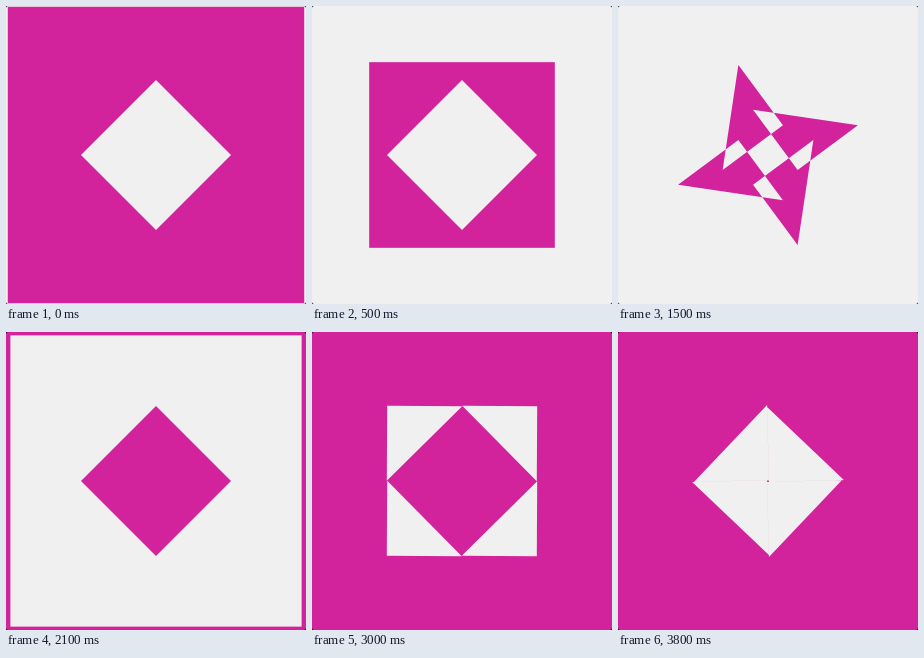
Write an HTML page with a canvas that moves like this. It is 300 by 298 pixels and loops after 3900 ms.

```html
<!DOCTYPE html>
<html lang="en">
<head>
<meta charset="utf-8">
<title>Square and pinwheel</title>
<style>
  html, body { margin: 0; width: 100%; height: 100%; overflow: hidden; background: #000; }
  canvas { display: block; width: 300px; height: 298px; border-radius: 2px; }
</style>
</head>
<body>
<canvas width="300" height="298"></canvas>
<script>
const ctx = document.querySelector('canvas').getContext('2d');
const PINK = '#d2239c', PALE = '#f0f0f0';
const LOOP = 3900, STEP = 100;
const R = 75; // half the diamond's diagonal

const clamp = x => Math.min(1, Math.max(0, x));
const easeShrink = x => x ** 1.5;
const easeTurn = x => x < 0.5 ? 4 * x ** 3 : 1 - 4 * (1 - x) ** 3;

function square(half, color) {
  ctx.fillStyle = color;
  ctx.fillRect(-half, -half, 2 * half, 2 * half);
}

function diamond(color) {
  ctx.fillStyle = color;
  ctx.beginPath();
  ctx.moveTo(0, -R);
  ctx.lineTo(R, 0);
  ctx.lineTo(0, R);
  ctx.lineTo(-R, 0);
  ctx.fill();
}

// Four corner triangles, each turning about the middle of its long side.
// Overlaps cancel out through the even-odd rule.
function pinwheel(angle, color) {
  const h = R / 2;
  ctx.fillStyle = color;
  ctx.beginPath();
  for (let k = 0; k < 4; k++) {
    ctx.save();
    ctx.rotate(k * Math.PI / 2);
    ctx.translate(-h, -h);
    ctx.rotate(angle);
    ctx.moveTo(-h, -h);
    ctx.lineTo(h, -h);
    ctx.lineTo(-h, h);
    ctx.closePath();
    ctx.restore();
  }
  ctx.fill('evenodd');
}

function draw(time) {
  const firstHalf = time < 2000;
  const local = firstHalf ? time + 55 : time - 2000;
  const [ground, shape] = firstHalf ? [PALE, PINK] : [PINK, PALE];
  const shrink = easeShrink(clamp(local / 665));
  const turn = easeTurn(clamp((local - 925) / 1000));

  ctx.setTransform(1, 0, 0, 1, 150, 149);
  square(150, ground);
  if (turn === 0) {
    square(R * (2 - shrink), shape);
    diamond(ground);
  } else if (turn < 1) {
    pinwheel(turn * Math.PI, shape);
  } else {
    diamond(shape);
  }
}

const start = performance.now();
function tick() {
  const elapsed = (performance.now() - start) % LOOP;
  draw(Math.floor(elapsed / STEP) * STEP);
  requestAnimationFrame(tick);
}
tick();
</script>
</body>
</html>
```
